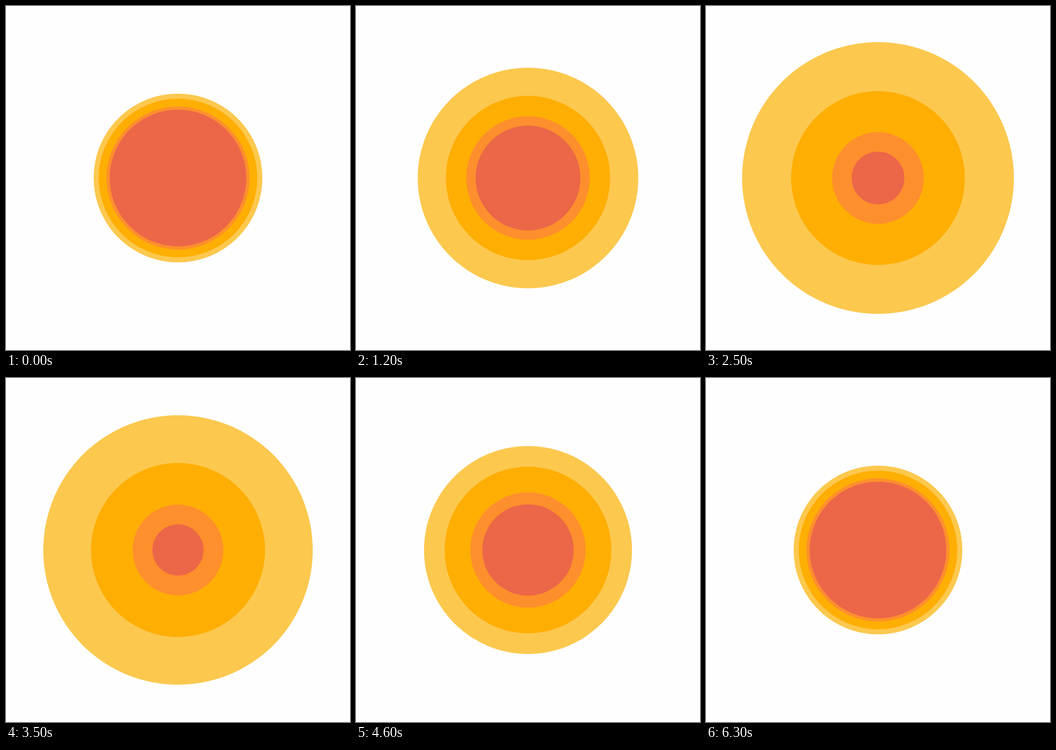
Animation, 748 px wide and 748 px high, one loop 6.4 s. Source, as an HTML page:

```html
<!DOCTYPE html>
<html lang="en">
<head>
<meta charset="utf-8">
<title>Pulsing rings</title>
<style>
  html, body { margin: 0; width: 100%; height: 100%; overflow: hidden; background: #fefefe; }
  svg { display: block; width: 100%; height: 100%; }
</style>
</head>
<body>
<svg viewBox="0 0 748 748">
  <circle cx="374" cy="374" fill="#fcc84e"/>
  <circle cx="374" cy="374" fill="#ffae03"/>
  <circle cx="374" cy="374" fill="#fe8f2d"/>
  <circle cx="374" cy="374" fill="#eb6747"/>
</svg>
<script>
const LOOP = 6400, CYCLE = 6300, STEP = 100;
const circles = document.querySelectorAll('circle');

// Easing along a cubic Bezier from (0,0) to (1,1) with handles (x1,0) and (x2,1).
function ease(u, x1, x2) {
  let lo = 0, hi = 1;
  for (let i = 0; i < 24; i++) {
    const s = (lo + hi) / 2, r = 1 - s;
    if (3 * s * r * r * x1 + 3 * s * s * r * x2 + s * s * s < u) lo = s;
    else hi = s;
  }
  return lo * lo * (3 - 2 * lo);
}

// 0 at start, 1 at peak, back to 0 one cycle after start.
function pulse(time, start, peak, rise, fall) {
  const t = (time - start + CYCLE) % CYCLE, up = peak - start;
  return t < up
    ? ease(t / up, ...rise)
    : 1 - ease((t - up) / (CYCLE - up), ...fall);
}

function draw(now) {
  const time = Math.floor(now % LOOP / STEP) * STEP;
  const halo = pulse(time, -170, 2900, [.28, .589], [.52, .399]);
  const core = pulse(time, -110, 3040, [.42, .58], [.42, .58]);
  const radii = [
    182 + 117.3 * halo,
    172.4 + 17.5 * core,
    155.6 - 59.5 * core,
    148.8 - 97.3 * core
  ];
  circles.forEach((circle, i) => circle.setAttribute('r', radii[i]));
}

function tick() {
  draw(performance.now());
  requestAnimationFrame(tick);
}
tick();
</script>
</body>
</html>
```
